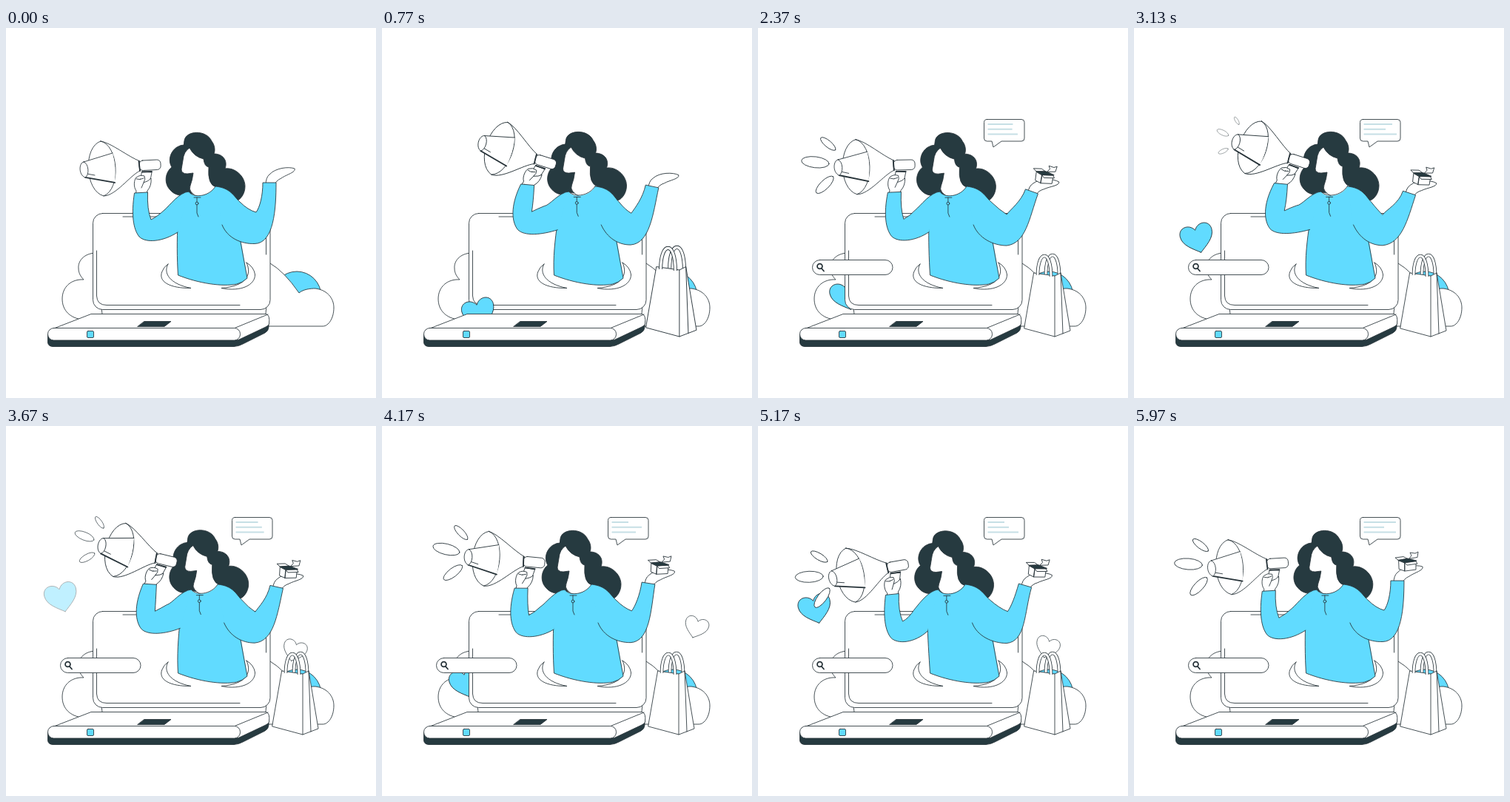
Recreate the animation shown at these times as an HTML page. Size 500 by 500 pixels, loop 6000 ms.

```html
<!DOCTYPE html>
<html lang="en">
<head>
<meta charset="utf-8">
<title>Online promotion</title>
<style>
  html, body { margin: 0; width: 100%; height: 100%; overflow: hidden; background: #fff; }
  svg { display: block; width: 100vw; height: 100vh; }
  .ink { fill: none; stroke: #263238; stroke-width: .85; stroke-linecap: round; stroke-linejoin: round; }
  .white { fill: #fff; }
  .blue { fill: #61dbff; }
  .dark { fill: #263a40; }
  .bare { stroke: none; }
  .thick { stroke-width: 1.8; }
</style>
</head>
<body>
<svg viewBox="0 0 500 500" class="ink">
  <defs>
    <path id="heart" d="M0 20C-9 13-22 5-22-7C-22-20-6-22 0-11C6-22 22-20 22-7C22 5 9 13 0 20Z"/>
    <path id="handle" d="M378 334C378 318 382 308 387 308S396 318 396 336"/>
  </defs>

  <!-- clouds -->
  <circle class="blue" cx="393" cy="362" r="33"/>
  <path class="white" d="M357 318Q376 329 396 358C402 353 411 352 418 352C434 354 443 365 443 378C443 392 436 403 428 403H350Z"/>
  <path class="white" d="M120 304C105 305 97 315 98 325C98 331 101 336 105 340C88 339 76 350 76 366C76 382 87 392 103 394L130 390Z"/>
  <g id="blueBack"><use href="#heart" class="blue"/></g>

  <!-- laptop -->
  <rect class="white" x="117.5" y="250.5" width="239.5" height="130" rx="13"/>
  <path d="M122.5 301V362Q123 374.500 136 374.500H316M158 255H338Q351.500 255 351.500 268V306"/>
  <g id="blueFront"><use href="#heart" class="blue"/></g>
  <path class="dark" d="M56.500 414V425Q57 430 63 430.500H308Q315 430 320 427L350 412Q355 409 355 404V396Z"/>
  <path class="white" d="M66 405.500L115 386.500H351Q357 387 355.500 400Q355 402 351 404L314 421.500Z"/>
  <path d="M309 405.500L354 387"/>
  <rect class="white" x="56.500" y="405.500" width="260" height="16.500" rx="8"/>
  <path class="dark" d="M187 396.500H223L214 403.500H178Z"/>
  <rect class="blue" x="109.500" y="409.500" width="9" height="9" rx="1.500"/>

  <g id="search">
    <rect class="white" x="73.500" y="313.500" width="108.500" height="20" rx="10"/>
    <circle class="thick" cx="83.500" cy="322" r="3.400"/>
    <path class="thick" d="M86 325L89 328.500"/>
  </g>

  <!-- woman -->
  <path class="white" d="M219 319C212 331 221 346 250 351.500C222 352 205 343 211 329Q213 323 219 319ZM325 317C333 334 324 349 291 351.500C318 357 337 347 336.500 333Q335 323 325 317Z"/>
  <g id="head">
    <path class="dark" d="M241 152C243 138 271 137 278 153C282 158 283 165 281 170C293 170 300 179 296 190C309 188 323 200 323 214C323 224 317 232 311 234L246 223C237 229 227 225 222 219C213 210 215 195 224 188C218 178 223 166 231 161Q236 158 240 158Z"/>
    <path class="white" d="M248 162Q240 167 239 179L237 191Q237 197 245 197L253 196Q252 205 249 213Q245 222 262 230Q278 225 284 215Q272 212 274 188Q268 187 267 177Q254 174 248 162Z"/>
  </g>
  <path id="torso" class="blue bare"/>
  <path id="torsoInk"/>
  <g id="collar">
    <path d="M247 221C252 230 274 229 283 214M254 229H263M258 229V250L260 255"/>
    <circle class="blue" cx="258" cy="237" r="1.900"/>
  </g>

  <g id="hand">
    <path class="white" d="M351 212Q351 202 356 198C364 189 382 187 390 190C392 195 379 198 372 203Q365 206 362 213Z"/>
    <g id="box">
      <path class="white" d="M358 182L366 185V196L358.500 193.500ZM366 185L381 183V194L366 196Z"/>
      <path class="dark" d="M357 181L370 179L382 182L367 185Z"/>
      <path class="white" d="M357 181L353 178L364 176.500L369 179ZM372 179L375 175L373 171L380 172L384 170L383 177ZM366 185L369 188L383 186L381 183Z"/>
    </g>
  </g>
  <path id="armR" class="blue"/>

  <g id="megaphone">
    <g id="waves">
      <ellipse class="white" rx="19" ry="7.500"/>
      <ellipse class="white" rx="13" ry="4.500"/>
      <ellipse class="white" rx="16" ry="6"/>
    </g>
    <path class="white" d="M184 194L197 195Q195 208 189 224H178Z"/>
    <path class="white" d="M175 228L176 220C172 215 173 205 176 202Q181 198 187 200Q189 204 186 209L183 216M186 209Q193 207 196 203Q197 213 191 220L190 226M176 204Q181 206 186 203"/>
    <path class="white" d="M128 153C142 155 165 174 181 180V193C168 199 148 227 132 227C106 220 104 160 128 153Z"/>
    <path d="M128 153C152 158 156 218 132 227"/>
    <path class="white bare" d="M105 181L144 169Q149 190 147 209L107 202Z"/>
    <path d="M105 181L144 169"/>
    <path class="thick" d="M107 202L147 209"/>
    <path d="M109 197L120 199"/>
    <path class="white" d="M105 181C98 182 98 199 107 202C113 199 112 183 105 181Z"/>
    <rect class="white" x="180" y="178.500" width="29" height="13.500" rx="5" transform="rotate(-3 195 185)"/>
    <path class="thick" d="M179.500 180L181 193M184 194.500L197 194"/>
  </g>
  <path id="armL" class="blue"/>

  <!-- floating things -->
  <g id="whiteHeart"><use href="#heart" class="white" transform="scale(.73)"/></g>
  <g id="bag">
    <g id="loops"></g>
    <path class="white" d="M373 331L401 335L409 331L422 409L401 417L360 406Z"/>
    <path d="M401 335V417M409 331L412 413"/>
    <g id="loopsFront"></g>
  </g>
  <g id="bubble">
    <path class="white" d="M309.500 123.500H356Q360 123.500 360 127.500V149Q360 153 356 153H329L318 161L316 153H309.500Q305.500 153 305.500 149V127.500Q305.500 123.500 309.500 123.500Z"/>
    <g stroke="#c6dfe5" stroke-width="2" stroke-linecap="butt"><path/><path/><path/></g>
  </g>
</svg>
<script>
const LOOP = 6;
const el = id => document.getElementById(id);
const put = (id, transform) => el(id).setAttribute('transform', transform);
const draw = (id, d) => el(id).setAttribute('d', d);
const show = (node, on) => node.style.display = on ? '' : 'none';
const clamp = x => Math.max(0, Math.min(1, x));
const backOut = u => 1 + 2.7 * (u - 1) ** 3 + 1.7 * (u - 1) ** 2;

// Band-shaped bag handles, one behind and one in front of the body
const band = shift => `<g transform="translate(${shift})" stroke-linecap="butt">
  <use href="#handle" stroke-width="4.6"/><use href="#handle" stroke="#fff" stroke-width="3"/></g>`;
el('loops').innerHTML = band('11 -1');
el('loopsFront').innerHTML = band('0 0');

// Poses: head shift, grip end x/y, megaphone tilt, right cuff x/y, right cuff tilt
const poseTimes = [0, .77, 1.63, 2.3, 3.13, 4.17, 5.17];
const poses = [
  [0, 209, 184, 0, 356, 209, 0],
  [7.5, 235, 185, 20.6, 365, 214, 12],
  [3.5, 222, 180, 11.5, 375, 228.5, 26],
  [-2, 211, 184, 1, 370, 221, 20],
  [8, 237, 184, 21, 372, 223, 18],
  [0, 220, 185, 8.5, 360, 212.5, 9],
  [-4.5, 203, 186, -7, 361, 215.5, 16]
];

function poseAt(t) {
  const n = poses.length;
  const time = i => poseTimes[(i + n) % n] + LOOP * Math.floor(i / n);
  const value = (i, k) => poses[(i + n) % n][k];
  let i = n - 1;
  while (time(i) > t) i--;
  const span = time(i + 1) - time(i), u = (t - time(i)) / span;
  return poses[0].map((_, k) => {
    const slope = j => (value(j + 1, k) - value(j - 1, k)) / (time(j + 1) - time(j - 1)) * span;
    const a = value(i, k), b = value(i + 1, k);
    return a + slope(i) * u * (1 - u) ** 2 + (b - a) * u * u * (3 - 2 * u) - slope(i + 1) * u * u * (1 - u);
  });
}

// Eased or linear interpolation through [time, value] stops
function through(stops, t, eased = true) {
  if (t <= stops[0][0]) return stops[0][1];
  for (let i = 1; i < stops.length; i++) {
    const [t0, a] = stops[i - 1], [t1, b] = stops[i];
    if (t <= t1) {
      let u = (t - t0) / (t1 - t0);
      if (eased) u = u * u * (3 - 2 * u);
      return a + (b - a) * u;
    }
  }
  return stops[stops.length - 1][1];
}

function turn(x, y, degrees) {
  const a = degrees * Math.PI / 180, c = Math.cos(a), s = Math.sin(a);
  return [x * c - y * s, x * s + y * c];
}

function drawWoman(t) {
  const [h, gx, gy, tilt, rx, ry, ra] = poseAt(t);
  put('head', `translate(${h} ${-h * .12})`);
  put('collar', `translate(${h * .7} ${-h * .08})`);
  const s = h * .7;
  const left = `M${232 + s} 262C${231 + s / 2} 288 231 310 232.500 334`;
  const hem = 'C260 345 292 350 312 346Q320 344 326 338';
  draw('torso', `${left}${hem}L317 285L${297 + s} 218L${283 + s} 214C${274 + s} 229 ${252 + s} 230 ${247 + s} 221Z`);
  draw('torsoInk', `${left}${hem}L317 289`);

  put('megaphone', `translate(${gx} ${gy}) rotate(${tilt}) translate(-209 -184)`);
  const at = (x, y) => {
    const [dx, dy] = turn(x - 209, y - 184, tilt);
    return [gx + dx, gy + dy];
  };
  const [cx, cy] = at(182.5, 222.5);
  const dx = cx - 182.5, dy = cy - 222.5, ox = 172 + dx * .25, low = 288 + dy * .87;
  const [ux, uy] = turn(9, -.5, tilt * .4);
  const ix = 196 + dx * .45, iy = 259 + dy;
  draw('armL', `M${247 + s} 221C${234 + s} 222 ${221 + s} 240 ${214 + s} ${246 + dy * .5}Q${ix + 8} ${iy - 4} ${ix} ${iy}
    Q${cx + ux - 1} ${iy - 14} ${cx + ux} ${cy + uy}L${cx - ux} ${cy - uy}
    C${ox - 3} ${cy + 30} ${ox} ${low - 16} ${ox + 8} ${low - 6}C${ox + 17} ${low + 3} ${ox + 40} ${low + 1} ${232 + s} ${276 + dy * .3}`);

  const [vx, vy] = turn(9, 0, ra), [wx, wy] = turn(0, 1, ra);
  const ex = 338 - (rx - 356) * .13, ey = 249 + (ry - 209) * .25;
  draw('armR', `M${283 + s} 214C${304 + s} 216 ${308 + s} 228 ${316 + s * .8} 235Q${327 + s * .4} 246 ${ex} ${ey}
    C${ex + 5} ${ey - 7} ${rx - vx + wx * 18} ${ry - vy + wy * 18} ${rx - vx} ${ry - vy}L${rx + vx} ${ry + vy}
    C${rx + vx + wx * 36} ${ry + vy + wy * 36} 362 291 336 ${291.5 + ra * .13}
    C${318 + s * .3} ${292 + ra * .1} ${299 + s} 284 ${292 + s * .8} 266`);
  put('hand', `translate(${rx} ${ry}) rotate(${ra * .5}) translate(-356 -209)`);
}

// Each sound mark grows out of its end nearest the horn: x, y, half length, angle
const marks = [[93, 187, 19, 5], [101, 168, 13, 38], [99, 204, 16, -46]];
function drawWaves(t) {
  const size = through([[1.15, 0], [1.63, .72], [2.3, 1], [3.13, .45], [4.17, .97], [5.17, 1]], t);
  show(el('waves'), size > .02);
  marks.forEach(([x, y, half, angle], i) =>
    el('waves').children[i].setAttribute('transform',
      `translate(${x} ${y}) rotate(${angle}) scale(${size || .01}) translate(${-half} 0)`));
}

function drawHeart(id, t, starts, xs, ys, angle) {
  const life = xs[xs.length - 1][0];
  const start = starts.find(s => t >= s && t < s + life);
  show(el(id), start !== undefined);
  if (start === undefined) return;
  const age = t - start;
  put(id, `translate(${through(xs, age, false)} ${through(ys, age, false)}) rotate(${angle})`);
  el(id).style.opacity = clamp((life - age) / .15);
}

function drawHearts(t) {
  const xs = [[0, 134], [.07, 131], [.42, 114], [.9, 91], [1.05, 85.5], [1.42, 77.5], [1.65, 74]];
  const ys = [[0, 392], [.07, 385], [.42, 347], [.9, 297], [1.05, 284], [1.42, 247], [1.65, 226]];
  drawHeart('blueFront', t, [.7], xs, ys, -15);
  drawHeart('blueBack', t, [2.08, 3.75], xs, ys, -15);
  if (t > 1.3 && t < 2.08) drawHeart('blueBack', t, [.73], xs, ys, -13);
  show(el('blueFront'), t >= .7 && t <= 1.3);
  drawHeart('whiteHeart', t, [.94, 3.4, 4.85],
    [[0, 384], [.32, 391], [.69, 417], [.77, 424.500], [1.1, 428]],
    [[0, 328], [.32, 299], [.69, 275], [.77, 272], [1.1, 250]], 18);
}

function pop(id, t, start, length, x, y, ease = backOut) {
  const u = clamp((t - start) / length);
  show(el(id), u > 0);
  const k = Math.max(.001, ease(u));
  put(id, `translate(${x} ${y}) scale(${k}) translate(${-x} ${-y})`);
}

const lines = [[340, 349, 333, 333, 354], [347, 340, 351, 339, 338], [347, 355, 343, 352, 354]];
function drawProps(t) {
  pop('bag', t, .4, .6, 392, 417);
  pop('box', t, 1.1, .4, 369, 194);
  pop('bubble', t, .9, .35, 320, 158);
  const bars = el('bubble').querySelector('g').children;
  lines.forEach((ends, i) => {
    const end = through(ends.map((x, k) => [poseTimes[[2, 4, 5, 6][k]] || LOOP, x]), t);
    bars[i].setAttribute('d', `M310.500 ${130 + 6.8 * i}H${end}`);
  });
  const u = clamp((t - 1.3) / .5);
  show(el('search'), u > 0);
  put('search', `translate(${45 * (1 - u) ** 2} 0)`);
  el('search').style.opacity = clamp(u * 2);
}

// The white heart rises from behind the bag
el('bag').before(el('whiteHeart'));

const began = performance.now();
function frame(now) {
  const t = Math.max(0, now - began) / 1000 % LOOP;
  drawWoman(t);
  drawWaves(t);
  drawHearts(t);
  drawProps(t);
  requestAnimationFrame(frame);
}
frame(began);
</script>
</body>
</html>
```
